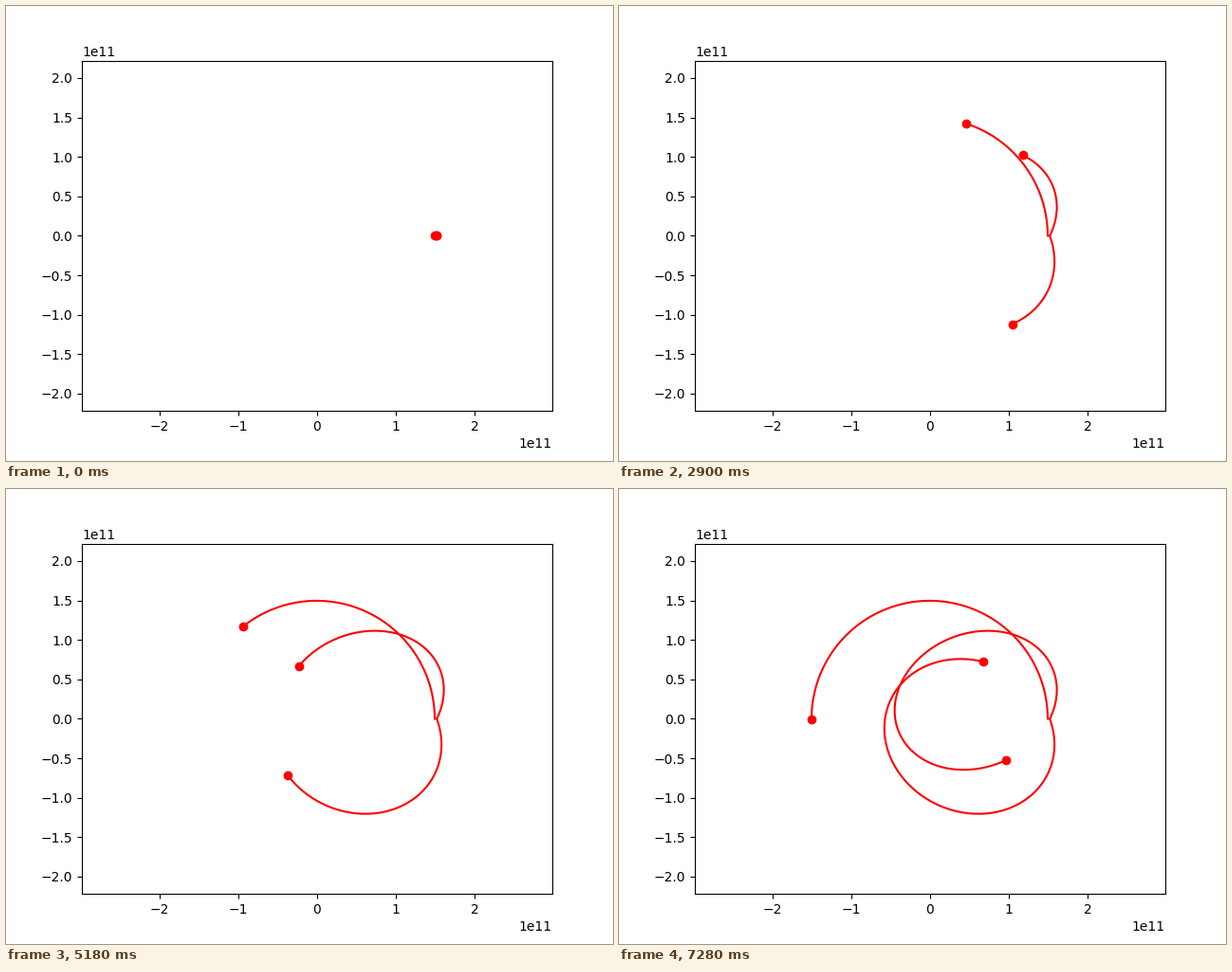
Animation of 640 by 480 pixels, one loop 7.3 s. Source, as a matplotlib script:

```python
import numpy as np
import matplotlib.pyplot as plt
from matplotlib.animation import FuncAnimation

FRAMES = 365
INTERVAL = 20
X_MAX = 2.98e11
Y_MAX = X_MAX * 369.6 / 496


def orbit(a, e, omega, m0, rate, sense=1):
    """Kepler ellipse around the origin; angles in degrees, rate per step."""
    mean = np.radians(m0 + rate * np.arange(FRAMES))
    ecc = mean.copy()
    for _ in range(30):
        ecc -= (ecc - e * np.sin(ecc) - mean) / (1 - e * np.cos(ecc))
    u = a * (np.cos(ecc) - e)
    v = a * np.sqrt(1 - e * e) * np.sin(ecc)
    c, s = np.cos(np.radians(omega)), np.sin(np.radians(omega))
    return u * c - v * s, sense * (u * s + v * c)


orbits = [
    orbit(1.496e11, 0.004, 0, 0, 0.4955),
    orbit(1.0538e11, 0.592, 202.05, 115.2, 0.8375),
    orbit(1.1007e11, 0.4962, 204.16, 121.05, 0.794, sense=-1),
]

fig, ax = plt.subplots(figsize=(6.4, 4.8), dpi=100)
ax.set_xlim(-X_MAX, X_MAX)
ax.set_ylim(-Y_MAX, Y_MAX)

trails = [ax.plot([], [], "r-", lw=1.5)[0] for _ in orbits]
bodies = [ax.plot([], [], "ro", ms=6)[0] for _ in orbits]


def update(i):
    for (x, y), trail, body in zip(orbits, trails, bodies):
        trail.set_data(x[:i + 1], y[:i + 1])
        body.set_data(x[i:i + 1], y[i:i + 1])
    return trails + bodies


anim = FuncAnimation(fig, update, frames=FRAMES, interval=INTERVAL,
                     repeat=True, repeat_delay=0, blit=False)
plt.show()
```
